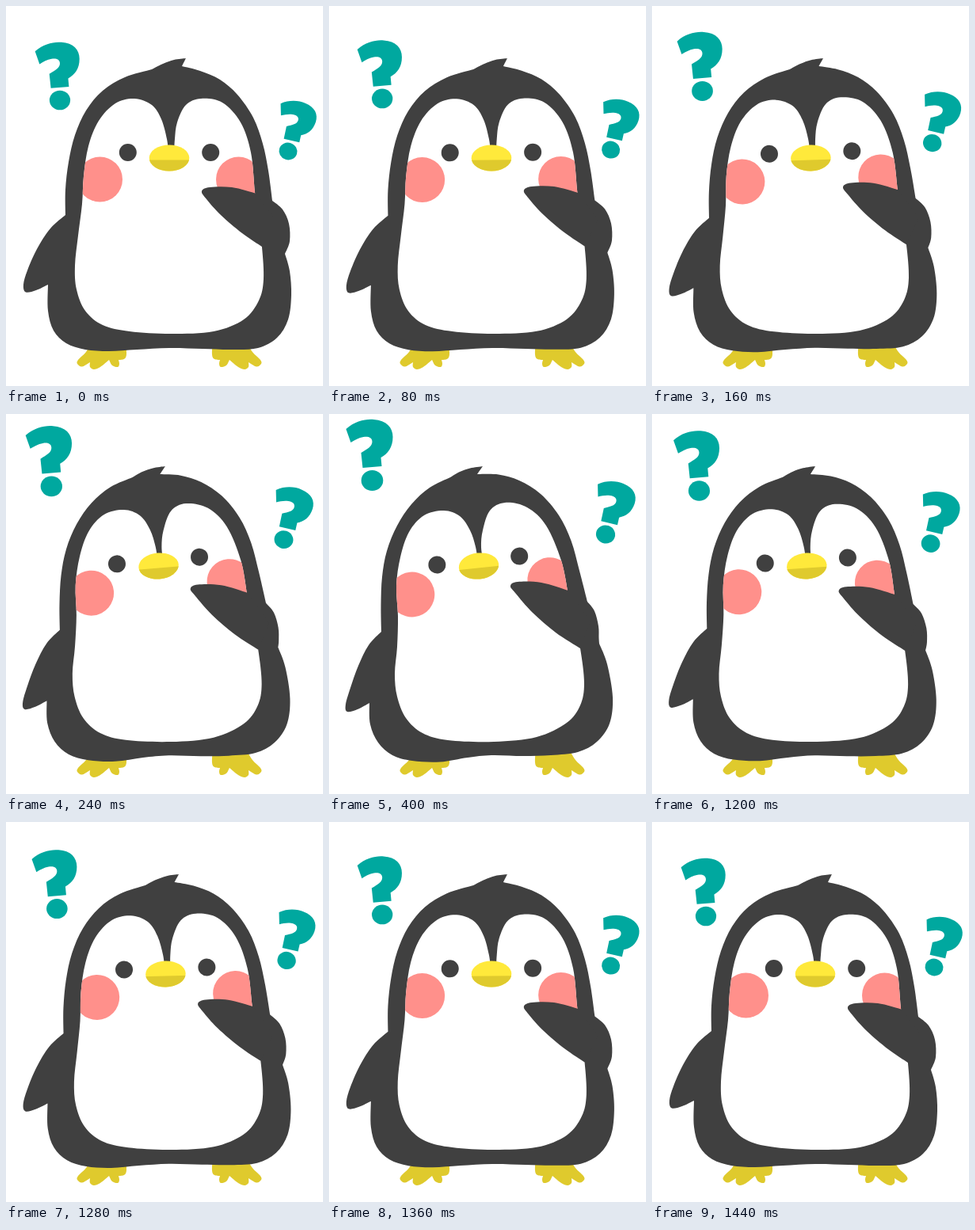
An HTML page with a canvas that plays this animation: 400x480 px, repeating every 1520 ms.

```html
<!DOCTYPE html>
<html lang="en">
<head>
<meta charset="utf-8">
<title>Puzzled penguin</title>
<style>
  html, body { margin: 0; width: 100%; height: 100%; overflow: hidden; background: #fff; }
  canvas { display: block; width: 400px; height: 480px; }
</style>
</head>
<body>
<canvas id="stage" width="400" height="480"></canvas>
<script>
const ctx = document.getElementById('stage').getContext('2d');
const DARK = '#404040', GOLD = '#dfca2d', YELLOW = '#ffe93b', PINK = '#ff908b', TEAL = '#00a89f';

const STEP = 80, STEPS = 19, TILT = -6 * Math.PI / 180;
const RISE = [0, 0.06, 0.33, 0.79, 0.96];
const FALL = [0.95, 0.63, 0.27, 0.06, 0];

// Each point is [x, y] upright, then [x, y] fully tilted.
const tuft = [[184,80,153,80], [198,73,165,73], [212,68,178,68.5], [227,66,194,66]];
const tuftBack = [[227,66,194,66], [222,76,187,76]];
const headRight = [
  [222,76,187,76], [245,82,214,76.5], [270,93,240,84], [292,112,267,101], [312,141,290,128],
  [324,174,305.5,160], [331,208,316,198], [336,246,326,237]
];
const shoulder = [
  [336,246,326,237], [349,257,335,249], [357,275,340,268], [358,297,340.5,283], [352,313,341,290]
];
const trunk = [
  [352,313,341,290], [358,335,351,316], [360,365,358,358], [356,396,354,391], [342,419,338,414],
  [318,432,314,427], [285,434,280,431], [248,433,245,432], [206,432,205,431], [165,434,175,434],
  [130,436,140,439.5], [100,434,105,438], [76,426,80,431], [60,410,62,415], [53,385,52,392],
  [53,352,51,365]
];
const wing = [
  [53,352,51,365], [38,359,36,373], [25,361.5,23,376], [22,352,21,367], [27,334,27,346],
  [39,307,37,318], [56,281,50,292], [75,264,66,275]
];
const headLeft = [
  [75,264,66,275], [75,232,65.5,242], [79,197,67,206], [87,163,73,173], [101,132,86,141],
  [122,107,104,114], [150,90,127,93], [184,80,153,80]
];
const outline = [tuft, tuftBack, headRight, shoulder, trunk, wing, headLeft];

const belly = [[
  [205,186,188,188], [203,168,185,168], [196,143,178,147], [184,125,165,129], [162,117,145,122],
  [138,123,120,128], [117,145,101,149], [104,177,90,181], [98,215,85,217], [96,250,87,255],
  [91,290,86,294], [87,328,83,328], [89,358,86,357], [100,385,97,384], [122,403,118,403],
  [156,411,150,412], [208,414,208,414], [262,411,262,408], [300,396,300,390], [319,372,317,368],
  [325,345,322,340], [323,305,317,296], [318,270,308,255], [314,235,302,228], [309,185,293,185],
  [296,147,274,141], [273,122,250,118], [246,117,222,112], [227,125,203,122], [216,147,194,147],
  [213,168,192,168], [212,186,195,188]
]];

const arm = [
  [[323,304,317,296], [298,287,286,276], [271,264,257,251], [253,244,235,226], [247,234,229,217],
   [257,229,238,212], [285,229,268,213], [316,237,302,223]],
  [[316,237,302,223], [340,270,330,262]]
];

const foot = [
  [[110,422], [101,437], [91,447], [90,452], [96,455.5], [106,450]],
  [[106,450], [106,456], [111,459], [119,456], [130,447]],
  [[130,447], [134,454], [141,456], [143,452], [142,447]],
  [[142,447], [149,446], [152,440], [151,422]]
];

const mark = new Path2D(
  'M-33-65C-22-75-8-78 2-77C18-76 26-67 26-55C26-42 20-34 11-29L12-18L-12-16L-14-35' +
  'C-6-40 0-43 0-49C0-55-6-56-11-55C-17-54-22-51-27-48Z');

const mix = (a, b, p) => a + (b - a) * p;

// Closed path of smooth runs that meet in corners.
function smoothPath(runs, p) {
  const path = new Path2D();
  runs.forEach((run, r) => {
    const pts = run.map(([x, y, tx = x, ty = y]) => [mix(x, tx, p), mix(y, ty, p)]);
    if (r === 0) path.moveTo(...pts[0]);
    for (let i = 1; i < pts.length; i++) {
      const a = pts[i - 1], b = pts[i];
      const before = pts[i - 2] || a, after = pts[i + 1] || b;
      path.bezierCurveTo(
        a[0] + (b[0] - before[0]) / 6, a[1] + (b[1] - before[1]) / 6,
        b[0] - (after[0] - a[0]) / 6, b[1] - (after[1] - a[1]) / 6,
        b[0], b[1]);
    }
  });
  path.closePath();
  return path;
}

function fill(path, color) {
  ctx.fillStyle = color;
  ctx.fill(path);
}

function oval(x, y, rx, ry, color) {
  const path = new Path2D();
  path.ellipse(x, y, rx, ry, 0, 0, Math.PI * 2);
  fill(path, color);
}

function drawFeet() {
  const shape = smoothPath(foot, 0);
  fill(shape, GOLD);
  ctx.save();
  ctx.translate(412, 0);
  ctx.scale(-1, 1);
  fill(shape, GOLD);
  ctx.restore();
}

function drawFace(p, skin) {
  ctx.save();
  ctx.clip(skin);
  placeFace(p);
  for (const side of [-1, 1]) oval(side * 87.5, 27, 28.5, 28.5, PINK);
  ctx.restore();

  ctx.save();
  placeFace(p);
  for (const side of [-1, 1]) oval(side * 52.2, -7, 11, 11, DARK);
  oval(0, 0, 25.3, 16.5, YELLOW);
  ctx.beginPath();
  ctx.rect(-30, 2.5, 60, 20);
  ctx.clip();
  oval(0, 0, 25.3, 16.5, GOLD);
  ctx.restore();
}

function placeFace(p) {
  ctx.translate(206 - 17 * p, 192);
  ctx.rotate(TILT * p);
}

function drawMark(x, y, size, turn) {
  ctx.save();
  ctx.translate(x, y);
  ctx.rotate(turn * Math.PI / 180);
  ctx.scale(size, size);
  fill(mark, TEAL);
  oval(0, 0, 13.8, 13, TEAL);
  ctx.restore();
}

function draw(p) {
  ctx.fillStyle = '#fff';
  ctx.fillRect(0, 0, 400, 480);
  drawFeet();
  fill(smoothPath(outline, p), DARK);
  const skin = smoothPath(belly, p);
  fill(skin, '#fff');
  drawFace(p, skin);
  fill(smoothPath(arm, p), DARK);
  const size = mix(0.95, 1, p);
  drawMark(mix(68, 54.5, p), mix(119, 84, p), size, 0);
  drawMark(mix(356, 349, p), mix(183.5, 152, p), size * 0.88, 18);
}

function tiltAt(ms) {
  const step = Math.floor(ms / STEP) % STEPS;
  if (step < RISE.length) return RISE[step];
  const left = step - (STEPS - FALL.length);
  return left < 0 ? 1 : FALL[left];
}

const start = performance.now();
function tick() {
  draw(tiltAt(performance.now() - start));
  requestAnimationFrame(tick);
}
tick();
</script>
</body>
</html>
```
